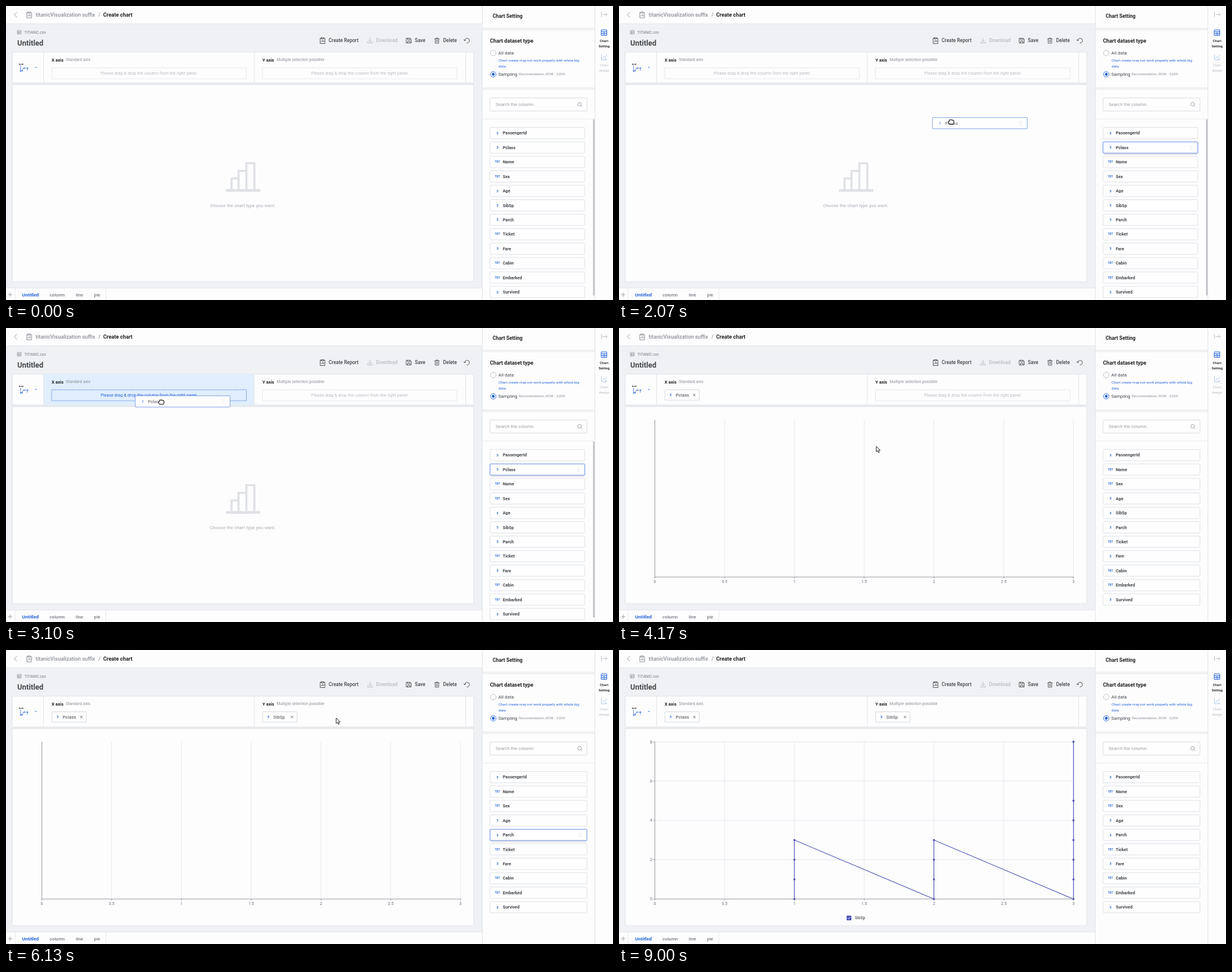
These frames come from a looping animation (1024x497 px, 9560 ms). An HTML page:

```html
<!DOCTYPE html>
<html lang="en">
<head>
<meta charset="utf-8">
<title>Create chart</title>
<style>
html, body { margin: 0; width: 100%; height: 100%; overflow: hidden; background: #eff1f4; }
svg { display: block; width: 1024px; height: 497px; font-family: Roboto, "Liberation Sans", sans-serif; }
text { white-space: pre; }
.icon { fill: none; stroke-linecap: round; stroke-linejoin: round; }
</style>
</head>
<body>
<svg id="stage" viewBox="0 0 1024 497" xmlns="http://www.w3.org/2000/svg"></svg>
<script>
const LOOP = 9560;
const BLUE = '#2563d9', DARK = '#44484e', GREY = '#8b8f96', PALE = '#b9bcc2', EDGE = '#dfe2e6', INDIGO = '#4e53b5';
const PITCH = 24.42, TOP = 205.4;
const COLUMNS = ['PassengerId', 'Pclass', 'Name', 'Sex', 'Age', 'SibSp', 'Parch', 'Ticket', 'Fare', 'Cabin', 'Embarked', 'Survived'];
const TEXTUAL = ['Name', 'Sex', 'Ticket', 'Cabin', 'Embarked'];
const HINT = 'Please drag & drop the column from the right panel.';

// Moments of the story, in ms.
const GRAB_X = 1900, OVER_X = 2630, DROP_X = 3620, CHART = 3850;
const GRAB_Y = 5120, OVER_Y = 5460, DROP_Y = 5780, SERIES = 6550, DRAW = 1000;

// Markup helpers; text is placed by the middle of its capitals.
const text = (x, cy, size, str, fill = DARK, weight = 400, anchor = 'start') =>
  `<text x="${x}" y="${cy + size * 0.355}" font-size="${size}" fill="${fill}" font-weight="${weight}" text-anchor="${anchor}">${str.replace('&', '&amp;')}</text>`;
const box = (x, y, w, h, fill, stroke = 'none', extra = '') =>
  `<rect x="${x}" y="${y}" width="${w}" height="${h}" fill="${fill}" stroke="${stroke}" ${extra}/>`;
const line = (d, stroke = EDGE, width = 0.9) =>
  `<path d="${d}" fill="none" stroke="${stroke}" stroke-width="${width}"/>`;
const icon = (x, y, d, stroke = DARK, width = 0.9) =>
  `<path class="icon" transform="translate(${x} ${y})" d="${d}" stroke="${stroke}" stroke-width="${width}"/>`;
const group = (id, body) => `<g id="${id}">${body}</g>`;
const range = (n, fn) => Array.from({ length: n }, (_, i) => fn(i)).join('');

const clipboard = 'M-2 -4H-4V5H4V-4H2M-2 -5H2V-3H-2ZM-2 2V1M0 2V-1M2 2V0';

function header() {
  return box(0, 0, 803, 30, '#fdfdfe') + line('M0 30H803', '#e3e6e9') +
    icon(16, 14.7, 'M2 -4L-2 0L2 4', GREY) +
    icon(39, 15, clipboard, GREY, 1) +
    text(50, 14.8, 8.9, 'titanicVisualization suffix', GREY, 500) +
    text(156, 14.8, 8.9, '/', GREY, 500) +
    text(164, 14.8, 8.9, 'Create chart', '#222', 700) +
    icon(22.5, 44.3, 'M-3 -3H3V3H-3ZM-3 -1H3M-3 1H3M-1 -1V3', GREY, 0.7) +
    text(31, 44.3, 6.65, 'TITANIC.csv', '#777b82') +
    text(19, 62.8, 12.5, 'Untitled', DARK, 700);
}

function toolbar() {
  const label = (x, str, fill = DARK) => text(x, 58.3, 8.15, str, fill, 500);
  return icon(534, 58.5, clipboard) + label(544.3, 'Create Report') +
    icon(614, 58.5, 'M0 -4V2M-2.5 -0.5L0 2L2.5 -0.5M-4 2V4H4V2', PALE) + label(624.3, 'Download', PALE) +
    icon(679.5, 58.5, 'M-4 -4H2.5L4 -2.5V4H-4ZM-2 -4V-1.5H2V-4M-2 4V1H2V4') + label(689.8, 'Save') +
    icon(727, 58.5, 'M-4 -3H4M-1.5 -3V-4.5H1.5V-3M-3 -3V4.5H3V-3M-1 -1V2.5M1 -1V2.5', DARK, 0.8) + label(737.5, 'Delete') +
    icon(777.8, 58.5, 'M-4 0A4 4 0 1 1 0 4M-5.5 -1.5L-4 0.5L-2.3 -1.3');
}

function axisZone(id, x, name, note) {
  const slot = (stroke, fill, dash) =>
    box(x + 13.5, 104.5, 328.5, 18.5, 'none', stroke, `stroke-dasharray="${dash}" stroke-width=".75"`) +
    text(x + 178, 113.7, 7.2, HINT, fill, 400, 'middle');
  return group(id + 'Hot', box(x, 78, 355, 52, '#e0eefd')) +
    text(x + 13.5, 91, 7.4, name, '#222', 700) + text(x + 37.5, 91, 6.8, note, GREY) +
    group(id + 'Slot', slot('#d6d9dd', PALE, '1.6 .6')) +
    group(id + 'HotSlot', slot('#4a7ee0', BLUE, '1.6 .6'));
}

function chip(id, x, name) {
  return group(id, box(x, 104.5, 58, 17.5, '#fefefe', '#cdd1d6', 'rx="1" stroke-width=".8"') +
    text(x + 9.5, 113.3, 5.6, '3', BLUE, 700, 'middle') +
    text(x + 18, 113.3, 7.7, name, DARK) +
    icon(x + 49.5, 113.3, 'M-1.6 -1.6L1.6 1.6M1.6 -1.6L-1.6 1.6', DARK, 0.8));
}

function axisCard() {
  return box(10.5, 78, 778.5, 52, '#fdfdfe', EDGE, 'stroke-width=".9"') +
    icon(30, 104, 'M-5.5 -3V6M-5.5 6H-2M-3 5L0 1H6M6 1V5', BLUE, 0.7) +
    icon(25.5, 98.5, 'M-3 0H3M-3 -1V1M3 -1V1', '#333', 0.8) +
    range(4, i => `<circle cx="${[24.5, 27, 30.5, 36.5][i]}" cy="${[110, 109, 105, 105][i]}" r=".9" fill="${BLUE}"/>`) +
    `<path d="M48.3 103H52.3L50.3 105.3Z" fill="${BLUE}" opacity=".6"/>` +
    axisZone('x', 63.5, 'X axis', 'Standard axis') +
    axisZone('y', 419, 'Y axis', 'Multiple selection possible') +
    chip('xChip', 77.5, 'Pclass') + chip('yChip', 433, 'SibSp') +
    line('M63.5 78V130M419 78V130M775.5 78V130');
}

const px = v => 60.5 + v * 235.4, py = v => 421 - v * 33.23;

function chart() {
  const runs = [[1, [0, 1, 2, 3]], [2, [0, 1, 2, 3]], [3, [0, 1, 2, 3, 4, 5, 8]]];
  const points = runs.flatMap(([x, ys]) => ys.map(y => [px(x), py(y)]));
  const grid = range(6, i => `M${px(i / 2 + 0.5)} 155V421`);
  const ticks = range(7, i => `M${px(i / 2)} 421V423.5`);
  const frame = line(grid, '#e3e5e9', 0.8) +
    `<g id="yScale">` + line(range(4, i => `M60 ${py(i * 2 + 2)}H767`), '#e0e4ea', 0.8) +
    line(range(5, i => `M57.5 ${py(i * 2)}H60`), '#6e7079', 0.7) +
    range(5, i => text(56, py(i * 2), 6.7, '' + i * 2, '#6e7079', 400, 'end')) + '</g>' +
    line('M60.5 155V421H767' + ticks, '#6e7079', 0.7) +
    range(7, i => text(px(i / 2), 428.3, 6.7, '' + i / 2, '#6e7079', 400, 'middle'));
  const series = `<clipPath id="reveal"><rect id="revealBox" x="56" y="150" width="0" height="276"/></clipPath>` +
    `<g clip-path="url(#reveal)">` + line('M' + points.join('L'), INDIGO, 1.15) +
    points.map(([x, y]) => `<circle cx="${x}" cy="${y}" r="1.8" fill="${INDIGO}"/>`).join('') + '</g>';
  const legend = box(384, 449, 8, 8, INDIGO, 'none', 'rx="1"') +
    icon(388, 453, 'M-2 0L-.5 1.6L2.2 -1.4', '#fff', 0.9) + text(398, 453, 6.8, 'SibSp', '#333');
  return group('chart', frame + group('series', series + legend));
}

function empty() {
  return group('empty', box(371, 309.5, 58, 4.5, '#dfe1e5') +
    line('M380.5 310V291.5H392.3V310M392.3 291V278.7H405.5V310M405.5 278V265.8H419V310', '#dfe1e5', 3.5) +
    text(399.5, 336.8, 7.7, 'Choose the chart type you want.', PALE, 500, 'middle'));
}

function tabs() {
  return box(0, 477, 803, 20, '#fdfdfe') + line('M0 476.8H803', '#e3e6e9') +
    icon(7, 488, 'M-3.2 0H3.2M0 -3.2V3.2', GREY, 0.8) + line('M15.5 477V497M168.5 477V497', '#e6e8eb') +
    text(41.2, 487.8, 8, 'Untitled', BLUE, 700, 'middle') +
    text(86.3, 487.8, 7.7, 'column', '#777b82', 500, 'middle') +
    text(124, 487.8, 7.7, 'line', '#777b82', 500, 'middle') +
    text(153.8, 487.8, 7.7, 'pie', '#777b82', 500, 'middle');
}

function panel() {
  const radio = (cy, on) => `<circle cx="822" cy="${cy}" r="4.6" fill="#fff" stroke="${on ? BLUE : '#b4b8be'}" stroke-width=".9"/>` +
    (on ? `<circle cx="822" cy="${cy}" r="2.4" fill="${BLUE}"/>` : '');
  return box(803, 0, 221, 497, '#fdfdfe') +
    box(803, 36.5, 190.5, 4.5, '#f0f1f3') + box(803, 137.5, 190.5, 4.5, '#f0f1f3') +
    line('M803.5 0V497M993.5 0V497') + line('M803 191H993', '#e6e8eb') +
    text(821, 16.8, 8.45, 'Chart Setting', '#222', 700) +
    text(816.5, 59, 8.8, 'Chart dataset type', '#222', 700) +
    radio(79.5) + text(830.5, 79.5, 7.8, 'All data') +
    text(831, 92.3, 6.13, 'Chart create may not work properly with whole big', BLUE) +
    text(831, 101.5, 6.13, 'data.', BLUE) +
    radio(115.5, true) + text(830.5, 115.5, 7.7, 'Sampling') +
    text(865, 115, 6.1, 'Recomendation, ROW : 3,000', GREY) +
    box(816.5, 155.5, 163.5, 22, '#fefefe', '#d3d6db', 'rx="1" stroke-width=".8"') +
    text(826, 166.7, 7.7, 'Search the column.', '#9a9da3') +
    icon(968, 166.5, 'M2 2L4 4M2.7 -.4A3.1 3.1 0 1 1 -3.5 -.4A3.1 3.1 0 1 1 2.7 -.4', GREY, 0.8) +
    icon(1009.5, 14.5, 'M-5 -4V4M-3 0H4.5M2 -2.5L4.5 0L2 2.5', PALE) +
    icon(1009, 45, 'M-4.5 -4.5H4.5V4.5H-4.5ZM-4.5 -1.5H4.5M-4.5 1.5H4.5M0 -1.5V4.5', BLUE, 1) +
    text(1009, 59, 5.8, 'Chart', '#333', 700, 'middle') + text(1009, 67.5, 5.8, 'Setting', '#333', 700, 'middle') +
    icon(1009, 86.5, 'M-4.5 -4.5V4.5H4.5M-2.5 2L0 -1L1.5 .5L4.5 -4M2 3H4', '#a9c3ef') +
    text(1009, 100, 5.8, 'Chart', PALE, 400, 'middle') + text(1009, 108.5, 5.8, 'design', PALE, 400, 'middle');
}

const handle = (x, y) =>
  range(6, i => `<circle cx="${x + (i % 2) * 2.6}" cy="${y + 6.5 + (i >> 1) * 3}" r=".5" fill="${PALE}"/>`);

function row(name, x, y, w, border = '#d9dce1', ink = 1) {
  const [kind, size] = TEXTUAL.includes(name) ? ['TXT', 4.6] : ['3', 5.6];
  return box(x, y, w, 19, '#fefefe', border, 'rx="1" stroke-width=".8"') +
    `<g opacity="${ink}">` + text(x + 12.5, y + 9.5, size, kind, BLUE, 700, 'middle') +
    text(x + 21.5, y + 9.5, 7.2, name, DARK, 700) + '</g>';
}
const hotRow = (name, x, y, w) =>
  box(x + 1, y + 19, w - 2, 3.2, '#000', 'none', 'opacity=".08"') + row(name, x, y, w, '#3f6fdc') + handle(x + w - 12.5, y);
const ghostRow = (name, w) => row(name, 0, 0, w, '#6a8fdd', 0.6) + handle(w - 12.5, 0);

const arrow = `<path d="M0 0V9.2L2.1 7.3L3.6 10.6L5.2 9.9L3.8 6.7H6.6Z" fill="#fff" stroke="#111" stroke-width=".9" stroke-linejoin="round"/>`;
const fist = `<path d="M-2.6 4L-4.6 1.2C-5.2 0 -4.2 -.8 -3.3 -.4V-2C-3.2 -3.4 -1.6 -3.6 -1.2 -2.8C-.6 -3.8 .8 -3.6 1 -2.7C1.8 -3.3 2.9 -3 3 -2C4 -2.4 4.8 -1.8 4.7 -.8C4.7 1.4 4.4 2.4 3.6 4Z" fill="#fff" stroke="#111" stroke-width="1.05" stroke-linejoin="round"/>`;

const stage = document.getElementById('stage');
stage.innerHTML = header() + toolbar() + axisCard() +
  box(10, 130.5, 779, 2, '#e6e8ec') + box(10.5, 133, 778.5, 333, '#fdfdfe', EDGE, 'stroke-width=".9"') +
  empty() + chart() + tabs() + panel() +
  group('rows', '') + box(990.3, 191.5, 2.7, 298, '#c3c5c9', 'none', 'id="scroll" rx="1"') +
  group('ghost', '') + group('arrow', arrow) + group('fist', fist);

const $ = id => document.getElementById(id);
const show = (id, on) => $(id).setAttribute('visibility', on ? 'visible' : 'hidden');
const move = (id, [x, y]) => $(id).setAttribute('transform', `translate(${x.toFixed(2)} ${y.toFixed(2)})`);

// Each key is [time, x, y], joined by straight segments.
const POINTER = [[1050, 720, 500], [1500, 852, 246], [1650, 861, 240], [GRAB_X, 861, 240], [1940, 822, 237], [2070, 561, 196],
  [2250, 434, 132], [2440, 362, 113.5], [2600, 362, 113.5], [2850, 285, 122], [3100, 262, 125], [DROP_X, 262, 125],
  [3700, 270, 130], [4120, 434, 200], [4530, 434, 200], [4850, 868, 325], [5000, 862, 312], [GRAB_Y, 862, 312],
  [5370, 583, 147], [5490, 557, 115], [6420, 557, 115], [7300, 640, -14]];
const GHOSTS = [
  { name: 'Pclass', slot: 1, from: GRAB_X, to: DROP_X, w: 160, path: [[GRAB_X, 816.5, 230], [1940, 783, 228], [2070, 529.5, 189],
    [2250, 389.5, 122], [2440, 318, 103.5], [2600, 318, 103.5], [2850, 241, 112], [3100, 218, 114.7]] },
  { name: 'SibSp', slot: 4, from: GRAB_Y, to: DROP_Y, w: 163, path: [[GRAB_Y, 816.5, 303], [5370, 538, 137], [5490, 512, 105]] }
];

function along(keys, t) {
  const i = keys.findIndex(k => k[0] > t);
  if (i < 0) return keys[keys.length - 1].slice(1);
  if (!i) return keys[0].slice(1);
  const [a, b] = [keys[i - 1], keys[i]], p = (t - a[0]) / (b[0] - a[0]);
  return [1, 2].map(n => a[n] + (b[n] - a[n]) * p);
}

function hotIndex(t, [x, y]) {
  // A dragged row stays lit, and after the drop its place does until the pointer moves.
  const held = GHOSTS.find(g => t >= g.from && t < (g.slot === 1 ? g.to + 60 : 6420));
  if (held) return held.slot;
  const i = Math.floor((y - TOP) / PITCH);
  return x > 816 && x < 980 && i >= 0 && y - TOP - i * PITCH < 19 ? i : -1;
}

let rowKey = '', ghostName = '';
function draw(t) {
  const hasX = t >= DROP_X, hasY = t >= DROP_Y, hasSeries = t >= SERIES;
  const drag = GHOSTS.find(g => t >= g.from && t < g.to);
  const at = along(POINTER, t);
  const names = COLUMNS.filter(n => !(hasX && n === 'Pclass') && !(hasY && n === 'SibSp'));
  const hot = hotIndex(t, at);
  const key = names.length + ':' + hot;
  if (key !== rowKey) {
    rowKey = key;
    $('rows').innerHTML = names.map((n, i) =>
      (i === hot ? hotRow : row)(n, 816.5, TOP + i * PITCH, hasX ? 163.5 : 160)).join('');
  }
  show('scroll', !hasX);

  const hotX = t >= OVER_X && !hasX, hotY = t >= OVER_Y && !hasY;
  show('xHot', hotX); show('xHotSlot', hotX); show('xSlot', !hotX && !hasX); show('xChip', hasX);
  show('yHot', hotY); show('yHotSlot', hotY); show('ySlot', !hotY && !hasY); show('yChip', hasY);

  show('empty', t < CHART);
  show('chart', t >= CHART);
  show('yScale', hasSeries);
  show('series', hasSeries);
  const p = Math.min(1, Math.max(0, (t - SERIES) / DRAW));
  $('revealBox').setAttribute('width', p * 716);

  show('ghost', !!drag);
  if (drag) {
    if (ghostName !== drag.name) {
      ghostName = drag.name;
      $('ghost').innerHTML = ghostRow(drag.name, drag.w);
    }
    move('ghost', along(drag.path, t));
  }
  const seen = t >= 1050 && t < 7300;
  show('arrow', seen && !drag);
  show('fist', seen && !!drag);
  move('arrow', at);
  move('fist', at);
}

// Inherited visibility: parts inside a hidden chart must not show themselves early.
const start = performance.now();
function tick() {
  draw((performance.now() - start) % LOOP);
  requestAnimationFrame(tick);
}
tick();
</script>
</body>
</html>
```
